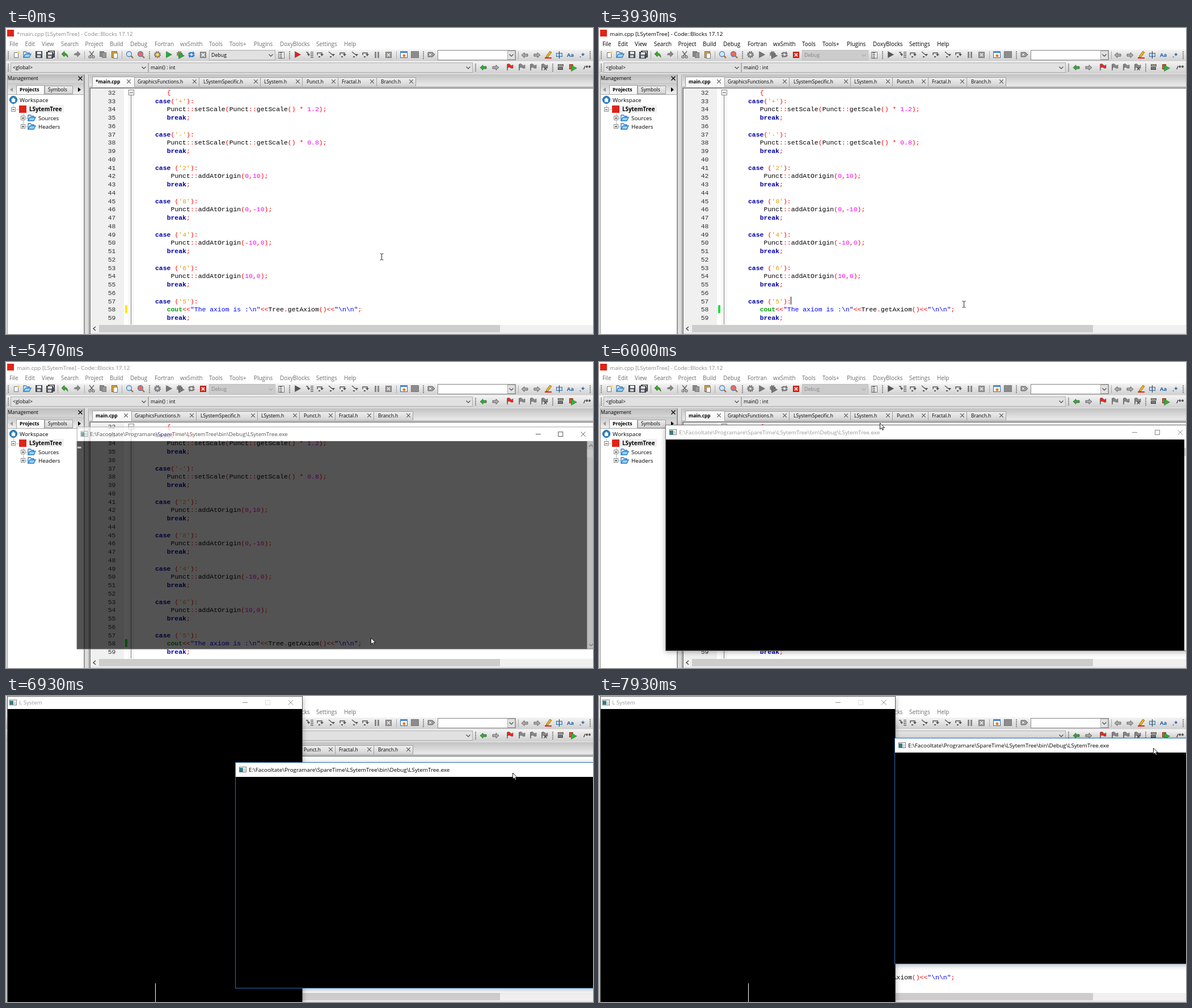
Recreate the animation shown at these times as an HTML page with a canvas. Size 1035 by 541 pixels, loop 8 s.

```html
<!DOCTYPE html>
<html lang="en">
<head>
<meta charset="utf-8">
<title>Editor and console</title>
<style>
html, body { margin: 0; width: 100%; height: 100%; overflow: hidden; background: #fff; }
canvas { display: block; width: 1035px; height: 541px; }
</style>
</head>
<body>
<canvas id="stage" width="1035" height="541"></canvas>
<script>
const W = 1035, H = 541, LOOP = 8000;
const g = document.getElementById('stage').getContext('2d');
const UI = '"Open Sans", "Noto Sans", sans-serif';
const MONO = '"Liberation Mono", monospace';
const CONSOLE_TITLE = 'E:\\Facooltate\\Programare\\SpareTime\\LSytemTree\\bin\\Debug\\LSytemTree.exe';

const CODE = `   {
case('+'):
   Punct::setScale(Punct::getScale() * 1.2);
   break;

case('-'):
   Punct::setScale(Punct::getScale() * 0.8);
   break;

case ('2'):
    Punct::addAtOrigin(0,10);
   break;

case ('8'):
    Punct::addAtOrigin(0,-10);
   break;

case ('4'):
    Punct::addAtOrigin(-10,0);
   break;

case ('6'):
    Punct::addAtOrigin(10,0);
   break;

case ('5'):
   cout<<"The axiom is :\\n"<<Tree.getAxiom()<<"\\n\\n";
   break;`.split('\n');

// time, x, y
const MOUSE = [
  [0, 662, 404], [69, 662, 404], [70, 639, 384], [460, 639, 384], [670, 654, 333],
  [920, 654, 333], [1600, 643, 488], [5470, 643, 488], [6000, 495, 108],
  [6200, 573, 129], [6530, 573, 129], [6930, 893, 136], [7530, 968, 83],
  [7670, 968, 83], [7930, 977, 92], [8000, 977, 92]
];
const CONSOLE = [
  [0, 117, 111], [6530, 117, 111], [6930, 404, 117], [7530, 512, 66],
  [7670, 512, 66], [7930, 521, 74], [8000, 521, 74]
];

const within = (t, a, b) => t >= a && t < b;

function along(keys, t) {
  let i = 1;
  while (i < keys.length - 1 && keys[i][0] < t) i++;
  const [a, b] = [keys[i - 1], keys[i]];
  const p = Math.min(1, (t - a[0]) / (b[0] - a[0]));
  return [a[1] + (b[1] - a[1]) * p, a[2] + (b[2] - a[2]) * p];
}

function box(x, y, w, h, fill, stroke) {
  if (fill) { g.fillStyle = fill; g.fillRect(x, y, w, h); }
  if (stroke) { g.strokeStyle = stroke; g.lineWidth = 1; g.strokeRect(x + .5, y + .5, w - 1, h - 1); }
}

function fade(y, h, top, bottom) {
  const c = g.createLinearGradient(0, y, 0, y + h);
  c.addColorStop(0, top);
  c.addColorStop(1, bottom);
  return c;
}

function text(s, x, y, color = '#000', size = 9.85, weight = 400, family = UI) {
  g.font = `${weight} ${size}px ${family}`;
  g.fillStyle = color;
  g.fillText(s, x, y);
}

function shape(x, y, d, fill, stroke, width = 1) {
  const p = new Path2D(d);
  g.save();
  g.translate(x, y);
  if (fill) { g.fillStyle = fill; g.fill(p); }
  if (stroke) { g.strokeStyle = stroke; g.lineWidth = width; g.stroke(p); }
  g.restore();
}

function disc(x, y, r, fill, stroke, width = 1) {
  g.beginPath();
  g.arc(x, y, r, 0, 7);
  if (fill) { g.fillStyle = fill; g.fill(); }
  if (stroke) { g.strokeStyle = stroke; g.lineWidth = width; g.stroke(); }
}

const cross = (x, y, r, color, width = 1) =>
  shape(x, y, `M${-r} ${-r}L${r} ${r}M${r} ${-r}L${-r} ${r}`, null, color, width);
const chevron = (x, y, color = '#444') => shape(x, y, 'M-3.5 -1.5L0 2L3.5 -1.5', null, color, 1.1);

function arrow(x, y, color, dir = 1) {
  const s = dir;
  shape(x, y, `M${6 * s} 0L${s} -4.5V-2H${-5 * s}V2H${s}V4.5Z`, color, '#444', .7);
}

function play(x, y, color) { shape(x, y, 'M-4.5 -5.5L5.5 0L-4.5 5.5Z', color, '#444', .5); }

function gripper(x, y) {
  for (let i = 0; i < 5; i++) box(x, y + i * 3, 2, 2, '#888');
}

function combo(x, y, w, label, on = true) {
  box(x, y, w, 18, on ? '#e1e1e1' : '#ccc', on ? '#adadad' : '#bfbfbf');
  text(label, x + 4, y + 12, on ? '#000' : '#838383', 8.8);
  chevron(x + w - 8, y + 9, on ? '#444' : '#aaa');
}

function gear(x, y, color, r = 4) {
  g.setLineDash([2, 1.4]);
  disc(x, y, r + 1, null, '#666', 2);
  g.setLineDash([]);
  disc(x, y, r, color, '#666', .8);
  disc(x, y, 1.5, '#eee');
}

function floppy(x, y) {
  box(x - 6, y - 6, 12, 12, '#555d6b', '#333');
  box(x - 3, y - 5, 7, 4, '#eee');
  box(x - 3, y + 1, 6, 4, '#ccc');
}

function page(x, y, fill = '#fff') { box(x - 4, y - 5, 8, 10, fill, '#777'); }

function folder(x, y, color) {
  shape(x, y, 'M-6 5V-5H-2L0 -3H4V0', '#fff', color, 1.3);
  shape(x, y, 'M-6 5L-3 -1H7L4 5Z', '#9ad2f5', color, 1.3);
}

function lens(x, y, tint) {
  shape(x, y, 'M2 2L6 6', null, '#b06a20', 2.4);
  disc(x - 1, y - 1, 4.5, tint, '#5580b0', 1.3);
}

function lines(x, y) {
  for (let k = 0; k < 4; k++) box(x, y + k * 3, 5, 1.4, '#666');
}

function stepIcon(x, y, i) {
  const c = '#555';
  if (i === 0) {
    shape(x, y, 'M-6 -4H-3V0H-1', null, c, 1.3);
    shape(x, y, 'M-2 -3L1 0L-2 3Z', c);
    lines(x + 2, y - 5);
  } else {
    shape(x, y, i % 2 ? 'M-5 1V-3H3V0' : 'M-5 -5L1 0', null, c, 1.4);
    shape(x, y, 'M0 -1H6L3 3Z', c);
    box(x - 3, y + 3, 3, 2, c);
  }
}

function flag(x, y, color) {
  shape(x, y, 'M-4 -5V6', null, '#555', 1.4);
  shape(x, y, 'M-4 -5Q-1 -7 1 -4T6 -4V2Q3 3 1 1T-4 2Z', color, '#555', .6);
}

function mainBar(building) {
  const y = 47;
  [3, 252, 499, 735, 1029].forEach(x => gripper(x, 41));
  [91, 138, 204, 688, 903].forEach(x => box(x, 41, 1, 14, '#aaa'));
  page(18, y + 1);
  disc(22, 43, 2, '#ffd84a');
  folder(37, y, '#3a78b5');
  floppy(58, y);
  floppy(80, y - 1);
  floppy(77, y + 1);
  shape(104, y, 'M-6 -1L-1 -6V-3Q5 -2 5 5Q3 1 -1 1V4Z', '#3aa52c', '#266b1e', .7);
  shape(125, y, 'M6 -1L1 -6V-3Q-5 -2 -5 0Q-3 1 1 1V4Z', '#888', '#666', .7);
  shape(151, y, 'M-4 -6L3 3M4 -6L-3 3', null, '#666', 1.4);
  disc(148, 51, 2, null, '#666', 1.2);
  disc(154, 51, 2, null, '#666', 1.2);
  page(169, y - 1, '#888');
  page(173, y + 1, '#999');
  box(186, 41, 10, 12, '#d9a345', '#8a6420');
  page(193, y + 2);
  lens(218, y, '#cfe8ff');
  lens(238, y, '#f06a5a');

  gear(267, y, building ? '#999' : '#f0b929');
  play(287, y, building ? '#777' : '#18b52c');
  gear(306, y - 1, building ? '#999' : '#f0b929', 3.2);
  play(309, y + 2, building ? '#777' : '#18b52c');
  const cycle = building ? '#777' : '#2b7bd0';
  shape(327, y, 'M-6 -1Q-4 -6 2 -4L3 -6L6 -1L1 0L2 -2Q-2 -3 -3 0Z', cycle);
  shape(327, y, 'M6 1Q4 6 -2 4L-3 6L-6 1L-1 0L-2 2Q2 3 3 0Z', cycle);
  box(342, 42, 11, 11, building ? '#e0281c' : '#999', building ? '#a01810' : '#777');
  cross(347.5, 47.5, 2.7, '#fff', 1.6);
  combo(358, 39, 117, 'Debug', !building);
  box(480, 42, 11, 12, '#f4f4f4', '#777');
  lines(482, 43);

  play(514, y, building ? '#555' : '#e0201c');
  [535, 554, 574, 594, 615, 634].forEach((x, i) => stepIcon(x, y, i));
  box(650, 42, 3, 11, '#888');
  box(655, 42, 3, 11, '#888');
  box(669, 42, 11, 11, '#999', '#777');
  cross(674.5, 47.5, 2.5, '#eee', 1.4);
  box(695, 41, 13, 12, '#fff', '#2d69b3');
  box(695, 41, 13, 3, '#3f84d4');
  disc(702, 49, 2.5, '#e27b22');
  box(714, 41, 14, 12, '#8c8c8c', '#777');
  shape(750, y, 'M-6 -4H2L6 0L2 4H-6Z', '#999', '#666');
  cross(748, y, 2, '#fff');
  box(761, 39, 138, 18, '#fff', '#8a8a8a');
  box(884, 40, 14, 16, '#e1e1e1', '#adadad');
  chevron(891, 48);
  arrow(915, 48, '#aaa', -1);
  arrow(936, 48, '#aaa');
  shape(956, y, 'M-3 2L3 -6L6 -4L0 4L-4 5Z', '#f0b020', '#8a5a10', .8);
  box(950, 52, 12, 2, '#e02020');
  box(970, 44, 11, 7, '#bcd8f4', '#3a70aa');
  box(975, 41, 1, 13, '#333');
  text('Aa', 989, 51, '#1d5fa8', 9.5, 700);
  text('.*', 1011, 52, '#1d5fa8', 11, 700);
}

function codeBar(t) {
  const busy = within(t, 2270, 3300);
  const blank = within(t, 2270, 2730);
  combo(8, 61, 243, blank ? '' : '<global>', !busy);
  combo(251, 61, 572, blank ? '' : 'main() : int', !busy);
  gripper(3, 63);
  gripper(827, 63);
  gripper(963, 63);
  arrow(842, 70, '#25b52a', -1);
  arrow(863, 70, '#aaa');
  flag(888, 69, '#e8261c');
  [909, 929, 949].forEach(x => flag(x, 69, '#888'));
  cross(951, 72, 2.5, '#444', 1.2);
  box(973, 64, 10, 4, '#b9a36a', '#555');
  box(973, 69, 9, 5, '#777', '#444');
  box(993, 64, 7, 9, '#e05a30', '#8a3a20');
  play(1001, 71, '#28b52e');
  text('/**', 1018, 73, '#222', 9, 700);
}

function tab(x, end, label, labelX, closeX, active) {
  const y = active ? 86 : 87;
  box(x, y, end - x, 104 - y, active ? fade(y, 18, '#fff', '#f4f4f4') : fade(y, 17, '#efefef', '#d2d2d2'), '#a0a0a0');
  if (active) box(x + 1, 102, end - x - 2, 3, '#f8f8f8');
  text(label, labelX, 97.5, '#000', active ? 8.4 : 8.45, active ? 700 : 400);
  cross(closeX, 94.5, 3.3, '#555', 1.1);
}

function editorTabs(saved) {
  box(147, 82, W - 147, 25, fade(82, 24, '#c2c2c2', '#f2f2f2'));
  box(147, 103, W - 147, 1, '#a6a6a6');
  box(147, 104, W - 147, 1, '#f4f4f4');
  box(147, 105, W - 147, 2, '#858585');
  const d = saved ? 0 : 5;
  let left = 221;
  for (const [label, x, close] of [
    ['GraphicsFunctions.h', 227, 327], ['LSystemSpecific.h', 343, 435], ['LSystem.h', 450, 509],
    ['Punct.h', 525, 572], ['Fractal.h', 587, 640], ['Branch.h', 656, 709]
  ]) {
    tab(left + d, close + 9 + d, label, x + d, close + .5 + d, false);
    left = close + 8;
  }
  tab(152, 222 + d, saved ? 'main.cpp' : '*main.cpp', 158, 211.5 + d, true);
}

const TOKEN = /"[^"]*"|'[^']*'|\b(?:case|break)\b|\bcout\b|[A-Za-z_]\w*|\d+(?:\.\d+)?|\s+|./g;

function tokenStyle(s) {
  if (s[0] === '"') return ['#0000ff', 400];
  if (s[0] === "'") return ['#e0a000', 400];
  if (s === 'case' || s === 'break') return ['#0000a0', 700];
  if (s === 'cout') return ['#00a000', 700];
  if (/^\d/.test(s)) return ['#f000f0', 400];
  return [/^\w/.test(s) ? '#000' : '#ff0000', 400];
}

function editor(t, saved) {
  const size = 11.46, advance = size * .6, pitch = 14.74;
  box(147, 107, W - 147, H - 107, '#fff');
  box(149, 107, 59, 418, '#f0f0f0');
  box(215, 107, 11, 418, '#f7f7f7');
  g.save();
  g.beginPath();
  g.rect(147, 107, W - 147, 417);
  g.clip();
  CODE.forEach((line, row) => {
    const y = 118 + row * pitch;
    text(String(32 + row), 179.7, y, '#333', size, 400, MONO);
    let col = 0;
    for (const s of line.match(TOKEN) || []) {
      const [color, weight] = tokenStyle(s);
      text(s, 263 + col * advance, y, color, size, weight, MONO);
      col += s.length;
    }
  });
  text('60', 179.7, 118 + 28 * pitch, '#333', size, 400, MONO);
  box(220, 119, 1, 406, '#808080');
  box(216, 109, 10, 10, '#fff', '#808080');
  box(218, 114, 6, 1, '#555');
  box(210, 490, 4, 14, saved ? '#1ee03c' : '#ffe600');
  const caret = within(t, 1530, 5270) &&
    !within(t, 2270, 2470) && !within(t, 3330, 3930) && !within(t, 4470, 4930);
  if (caret) box(338, 475, 1, 14, '#000');
  g.restore();
  box(148, 525, W - 148, 14, '#f0f0f0');
  box(164, 525, 707, 13, '#cdcdcd');
  shape(156, 531.5, 'M2 -3.5L-2 0L2 3.5', null, '#444', 1.4);
  box(148, 539, W - 148, 2, '#e4e4e4');
  box(145, 82, 1, H - 82, '#a6a6a6');
  box(147, 105, 2, H - 105, '#858585');
}

function treeItem(y, label) {
  box(26, y, 12, 1, '#bbb');
  box(26, y - 4, 8, 8, '#fff', '#888');
  box(28, y, 4, 1, '#333');
  box(29.5, y - 2, 1, 4, '#333');
  folder(45, y, '#1f78c8');
  text(label, 57, y + 3.5);
}

function projectPanel() {
  box(2, 82, 136, H - 82, '#fff');
  box(2, 82, 136, 15, fade(82, 15, '#bcbcbc', '#d6d6d6'));
  text('Management', 3, 92, '#000', 8.7);
  cross(131, 89, 3.5, '#000', 1.3);
  box(2, 97, 136, 21, fade(97, 21, '#c7c7c7', '#f2f2f2'));
  box(18, 101, 50, 17, fade(101, 17, '#fff', '#f4f4f4'), '#a0a0a0');
  box(68, 102, 50, 15, fade(102, 15, '#efefef', '#d2d2d2'), '#a0a0a0');
  text('Projects', 24, 112, '#000', 8.6, 700);
  text('Symbols', 74, 112, '#000', 8.6);
  shape(10, 109, 'M2 -4V4L-3 0Z', '#999');
  shape(129, 109, 'M-2 -4V4L3 0Z', '#000');
  box(2, 117, 136, 1, '#a6a6a6');
  box(137, 82, 2, H - 82, '#959595');
  box(2, 82, 1, H - 82, '#9a9a9a');

  disc(13, 127, 6.5, '#2d84c8', '#17588f');
  shape(13, 127, 'M-4 0L0 -4L4 0H3V4H-3V0Z', '#fff');
  text('Workspace', 24, 131);
  box(13, 135, 1, 6, '#bbb');
  box(9, 140, 8, 8, '#fff', '#888');
  box(11, 144, 4, 1, '#333');
  box(18, 144, 4, 1, '#bbb');
  box(23, 137, 13, 13, '#e02418');
  box(39, 136, 63, 14, '#f0f0f0');
  text('LSytemTree', 41, 146.5, '#000', 9.85, 700);
  box(30, 151, 1, 20, '#bbb');
  treeItem(159, 'Sources');
  treeItem(174, 'Headers');
}

function ide(t) {
  const active = within(t, 470, 5270), saved = t >= 1800, building = t >= 2000;
  box(0, 0, W, H, '#ddd');
  box(0, 0, W, 38, '#fff');
  box(2, 3, 12, 12, '#e02418');
  text((saved ? '' : '*') + 'main.cpp [LSytemTree] - Code::Blocks 17.12', 19, 13.5, active ? '#000' : '#8a8a8a');
  for (const [label, x] of [
    ['File', 6], ['Edit', 33.5], ['View', 63], ['Search', 97], ['Project', 139.5], ['Build', 183],
    ['Debug', 219], ['Fortran', 262], ['wxSmith', 307], ['Tools', 358], ['Tools+', 394],
    ['Plugins', 437], ['DoxyBlocks', 483], ['Settings', 547], ['Help', 596]
  ]) text(label, x, 32, active ? '#000' : '#6d6d6d', 9.9);
  box(0, 38, W, 20, fade(38, 20, '#f4f4f4', '#d0d0d0'));
  box(0, 59, W, 21, fade(59, 21, '#f4f4f4', '#d0d0d0'));
  mainBar(building);
  codeBar(t);
  projectPanel();
  editorTabs(saved);
  editor(t, saved);
}

// Opens a window with a short zoom and fade around its centre.
function opening(t, start, cx, cy, draw) {
  const p = Math.min(1, (t - start) / 250);
  if (p <= 0) return;
  const s = 1 - .15 * (1 - p) ** 3;
  g.save();
  g.globalAlpha = Math.min(1, p * 1.3);
  g.translate(cx, cy);
  g.scale(s, s);
  g.translate(-cx, -cy);
  draw(p === 1);
  g.restore();
}

function frame(x, y, w, h, bar, title, titleX, active, shadow) {
  if (shadow) {
    g.save();
    g.shadowColor = 'rgba(0,0,0,.3)';
    g.shadowBlur = 9;
    g.shadowOffsetY = 2;
    box(x, y, w, h, '#fff');
    g.restore();
  }
  box(x, y, w, bar, '#fff');
  box(x, y + bar, w, h - bar, '#000');
  const mid = y + bar / 2;
  box(x + titleX - 17, mid - 5, 13, 10, '#fff', '#777');
  box(x + titleX - 16, mid - 3, 6, 7, '#2f7f86');
  box(x + titleX - 9, mid - 2, 3, 5, '#ccc');
  text(title, x + titleX, mid + 3.7, active ? '#000' : '#999');
}

function buttons(x, y, close, color, maxColor) {
  box(x + close - 85, y, 9, 1, color);
  box(x + close - 45, y - 4, 9, 9, null, maxColor);
  cross(x + close, y + .5, 4.2, color);
}

function consoleWindow(t) {
  const [x, y] = along(CONSOLE, t).map(Math.round);
  const active = within(t, 5330, 5930) || t >= 6470;
  opening(t, 5340, x + 466, y + 200, open => {
    frame(x, y, 932, 400, 26, CONSOLE_TITLE, 24, active, open);
    buttons(x, y + 13, 908, active ? '#000' : '#888', active ? '#000' : '#888');
    box(x + 915, y + 26, 17, 374, '#f0f0f0');
    box(x + 915, y + 41, 17, 14, '#cdcdcd');
    shape(x + 922, y + 34, 'M-3.5 2L0 -1.5L3.5 2', null, '#555', 1.3);
    chevron(x + 922, y + 392);
    if (within(t, 5330, 5800)) box(x + 1, y + 36, 7, 3, '#fff');
    box(x, y, 932, 400, null, active && open ? '#2b6fb8' : '#7a7a7a');
  });
}

function plotWindow(t) {
  const active = t < 6470;
  opening(t, 6100, 262, 270, open => {
    frame(2, 0, 521, 560, 23, 'L System', 21, active, open);
    buttons(2, 11, 500, active ? '#000' : '#888', '#ddd');
    box(263, 508, 1, 40, '#fff');
    box(2, 0, 521, 560, null, '#555');
  });
}

function pointer(t) {
  const [x, y] = along(MOUSE, t).map(Math.round);
  if (t < 5270) {
    shape(x + .5, y + .5, 'M-3 -5.5H-1L0 -4.5L1 -5.5H3M0 -4.5V4.5M-3 5.5H-1L0 4.5L1 5.5H3', null, '#222', 1);
  } else {
    shape(x + .5, y, 'M0 0V11L2.6 8.6L4.4 12.4L6.1 11.6L4.4 8H8Z', '#fff', '#000', .9);
  }
}

function draw(t) {
  ide(t);
  const windows = [consoleWindow, plotWindow];
  if (t >= 6470) windows.reverse();
  windows.forEach(show => show(t));
  pointer(t);
}

const TICK = 200 / 3;
let start, last = -1;
function run(now) {
  start ??= now;
  const tick = Math.floor(((now - start) % LOOP + 4) / TICK) % (LOOP / TICK);
  const t = Math.round(tick * TICK / 10) * 10;
  if (t !== last) draw(last = t);
  requestAnimationFrame(run);
}
draw(0);
requestAnimationFrame(run);
</script>
</body>
</html>
```
